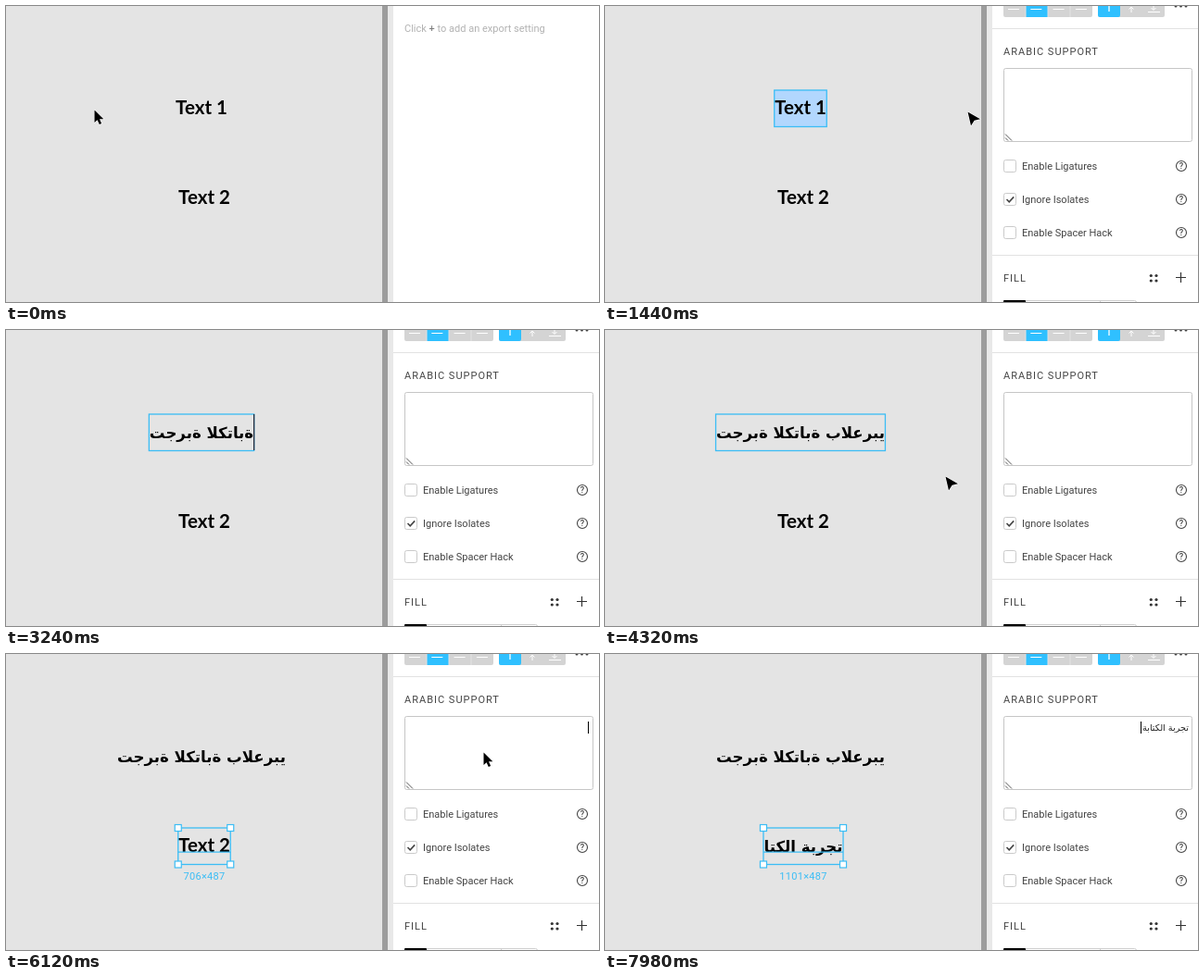
An HTML page for the animation above (8000 ms loop, 640 by 320 pixels).

```html
<!DOCTYPE html>
<html lang="en">
<head>
<meta charset="utf-8">
<title>Arabic text support</title>
<style>
  html, body { margin: 0; width: 100%; height: 100%; overflow: hidden; background: #e4e4e4; }
  svg { display: block; width: 640px; height: 320px; }
  text { font-family: Roboto, sans-serif; font-size: 11px; fill: #444; white-space: pre; }
  .head { letter-spacing: 1px; }
  .layer { fill: #000; font-weight: 700; text-anchor: middle; direction: rtl; }
  .label { fill: #3bbdf5; text-anchor: middle; letter-spacing: .3px; }
  .arabic { font-family: "DejaVu Sans", sans-serif; fill: #222; direction: rtl; text-anchor: start; }
</style>
</head>
<body>
<svg id="stage" viewBox="0 0 640 320">
  <rect width="640" height="320" fill="#e4e4e4"/>
  <rect x="406" width="6" height="320" fill="#9c9c9c"/>
  <rect x="412" width="6" height="320" fill="#e8e8e8"/>
  <rect x="418" width="222" height="320" fill="#fff"/>
  <text id="hint" x="430" y="28" style="fill:#b2b2b2">Click <tspan fill="#777">+</tspan> to add an export setting</text>
  <g id="panel"></g>
  <g id="canvas"></g>
  <g id="cursor"></g>
</svg>
<script>
const LOOP = 8000;
const BLUE = '#3bbdf5';
const PHRASE = 'تجربة الكتابة بالعربي';
const SHORT = PHRASE.slice(0, 13);
const $ = id => document.getElementById(id);

function add(parent, tag, attrs = {}, content = '') {
  const el = document.createElementNS('http://www.w3.org/2000/svg', tag);
  set(el, attrs);
  el.textContent = content;
  return parent.appendChild(el);
}
function set(el, attrs) {
  for (const k in attrs) el.setAttribute(k, attrs[k]);
}
function show(el, on) {
  el.setAttribute('visibility', on ? 'visible' : 'hidden');
}
const reverse = s => [...s].reverse().join('');

// Inspector panel
const panel = $('panel');
const box = (x, y, width, height, fill, more) => add(panel, 'rect', { x, y, width, height, fill, ...more });
const line = (d, stroke, width = 1) =>
  add(panel, 'path', { d, stroke, fill: 'none', 'stroke-width': width });

function buildPanel() {
  box(430, -10, 96, 22, '#d4d4d4', { rx: 2 });
  box(454, -10, 24, 22, '#2fc0ff');
  line('M454 0V12M478 0V12M502 0V12', '#e2e2e2');
  for (let i = 0; i < 4; i++) line(`M${435 + i * 24.3} 3.5h12`, '#fff');
  box(532, -10, 72, 22, '#d4d4d4', { rx: 2 });
  box(532, -10, 24, 22, '#2fc0ff', { rx: 2 });
  line('M544 0V6', '#fff', 1.3);
  line('M568 7V1M565.5 3.5L568 1L570.5 3.5', '#fff');
  line('M592 0V4M589.5 2L592 4.5L594.5 2M586 6.5H599', '#fff');
  for (const cx of [616, 621.5, 627]) add(panel, 'circle', { cx, cy: 0, r: 1.5, fill: '#444' });
  line('M418 24.5H640M418 269.5H640', '#e2e2e2');

  add(panel, 'text', { x: 430, y: 53, class: 'head' }, 'ARABIC SUPPORT');
  box(430.5, 67.5, 203, 79, '#fff', { rx: 2, stroke: '#c6c6c6' });
  line('M432 138.5L439 145.5M432 142.5L435 145.5', '#555');

  ['Enable Ligatures', 'Ignore Isolates', 'Enable Spacer Hack'].forEach((name, i) => {
    const y = 173 + i * 36;
    box(430.5, y - 6.5, 13, 13, '#fff', { rx: 2, stroke: '#cacaca' });
    if (i === 1) line(`M433.5 ${y}l2.7 2.8l5 -5.4`, '#444', 1.6);
    add(panel, 'text', { x: 450, y: y + 4 }, name);
    add(panel, 'circle', { cx: 622, cy: y, r: 5.5, fill: 'none', stroke: '#444', 'stroke-width': 1.1 });
    add(panel, 'text', { x: 622, y: y + 3.3, 'text-anchor': 'middle', style: 'font-size:9px;font-weight:500' }, '?');
  });

  add(panel, 'text', { x: 430, y: 298, class: 'head' }, 'FILL');
  for (const cx of [589.3, 595])
    for (const cy of [291.5, 297]) add(panel, 'circle', { cx, cy, r: 1.6, fill: '#333' });
  line('M616 293.5H627M621.5 288V299', '#333', 1.2);
  box(430.5, 318.5, 143, 20, '#fff', { rx: 2, stroke: '#cfcfcf' });
  line('M534.5 318V320', '#cfcfcf');
  box(430, 318, 24, 4, '#000', { rx: 1 });
}
buildPanel();
const field = add(panel, 'text', { x: 630, y: 83, class: 'arabic' });
const caret = add(panel, 'rect', { y: 73, width: 1, height: 13, fill: '#000' });

// Picks the type size at which a phrase has its natural width on the stage
function sizeFor(el, content, width) {
  el.textContent = content;
  el.style.fontSize = '100px';
  return 100 * width / el.getComputedTextLength();
}

// Text layers on the canvas
class Layer {
  constructor(name, cx, base) {
    Object.assign(this, { name, cx, base });
    const g = $('canvas');
    this.mark = add(g, 'rect', { fill: '#b2d7fe' });
    this.text = add(g, 'text', { x: cx, y: base, class: 'layer' });
    this.under = add(g, 'path', { stroke: BLUE, 'stroke-width': 1.2 });
    this.frame = add(g, 'rect', { fill: 'none', stroke: BLUE, 'stroke-width': 1.3 });
    this.caret = add(g, 'rect', { width: 1.2, height: 39, fill: '#223' });
    this.handles = [0, 1, 2, 3].map(() =>
      add(g, 'rect', { width: 7, height: 7, fill: '#fff', stroke: BLUE, 'stroke-width': 1.2 }));
    this.label = add(g, 'text', { x: cx, y: base + 30, class: 'label' });
  }
  write(content) {
    const latin = content === this.name;
    this.text.style.fontFamily = latin ? 'Lato, sans-serif' : '"DejaVu Sans", sans-serif';
    this.text.style.fontSize = (latin ? 20.5 : layerSize) + 'px';
    this.text.textContent = content;
    return latin ? 55.5 : this.text.getComputedTextLength();
  }
  // mode: '', 'hover', 'select' or 'edit'
  draw(content, mode, { marked = false, blink = false } = {}) {
    const w = this.write(content) + 1;
    const x = this.cx - w / 2, y = this.base - 26, h = 39.5;
    const selected = mode === 'select';
    set(this.frame, { x, y, width: w, height: h });
    set(this.mark, { x, y, width: w, height: h });
    set(this.under, { d: `M${x} ${this.base + .2}h${w}` });
    set(this.caret, { x: x + w - .6, y });
    this.handles.forEach((el, i) => {
      set(el, { x: x + (i % 2) * w - 3.5, y: y + (i > 1) * h - 3.5 });
      show(el, selected);
    });
    const units = content === this.name ? 706 : Math.round((w - 1) * unitsPerPx);
    this.label.textContent = units + '×487';
    show(this.label, selected);
    show(this.under, selected || mode === 'hover');
    show(this.frame, selected || mode === 'edit');
    show(this.mark, marked);
    show(this.caret, blink);
  }
}
const first = new Layer('Text 1', 211, 117);
const second = new Layer('Text 2', 214, 214);

first.text.style.fontFamily = '"DejaVu Sans", sans-serif';
const layerSize = sizeFor(first.text, reverse(PHRASE), 182);
field.style.fontSize = sizeFor(field, SHORT, 50) + 'px';
const unitsPerPx = 1101 / second.write(PHRASE.slice(0, 11));

// Pointer shapes
const pointer = d => add($('cursor'), 'path', {
  d, fill: '#000', stroke: '#fff', 'stroke-width': 1.2, 'stroke-linejoin': 'round', 'paint-order': 'stroke'
});
const arrow = pointer('M.5 .5V14L3.6 11.2L5.8 16L8.1 15L6 10.3H10.3Z');
const wide = pointer('M.5 .5L14 8.3L7.6 9.8L4 15.6Z');

// Time, x, y
const PATH = [
  [0, 95, 112], [60, 108, 112], [120, 150, 111], [180, 198, 110], [240, 218, 109],
  [960, 218, 109], [1260, 320, 114], [1440, 391, 114],
  [4200, 391, 114], [4320, 367, 158], [4560, 345, 182], [4860, 345, 182],
  [5160, 224, 205], [5340, 224, 205], [5640, 500, 122], [5940, 515, 106], [8000, 515, 106]
];
function pointerAt(t) {
  const i = PATH.findIndex(p => p[0] > t);
  const [t0, x0, y0] = PATH[i - 1], [t1, x1, y1] = PATH[i];
  const k = (t - t0) / (t1 - t0);
  return [x0 + (x1 - x0) * k, y0 + (y1 - y0) * k];
}

const typed = (t, start, step, max) =>
  t < start ? 0 : Math.min(max, 1 + Math.floor((t - start) / step));

function render(time) {
  const t = Math.floor(time / 60) * 60;
  const open = t >= 480;
  show($('hint'), !open);
  $('panel').style.display = open ? '' : 'none';

  const editing = t >= 780 && t < 4560;
  const n = typed(t, 1620, 135, 5) + typed(t, 2460, 100, 8) + typed(t, 3300, 100, 8);
  const mode1 = t < 240 ? '' : t < 480 ? 'hover' : editing ? 'edit' : t < 5280 ? 'select' : '';
  first.draw(n ? reverse(PHRASE.slice(0, n)) : first.name, mode1, {
    marked: editing && !n,
    blink: n > 0 && t < 4260
  });

  const letters = typed(t, 6420, 120, 13);
  const applied = typed(t, 6720, 120, 13);
  const mode2 = t >= 5280 ? 'select' : t >= 5160 ? 'hover' : '';
  second.draw(applied ? PHRASE.slice(0, applied) : second.name, mode2);

  field.textContent = SHORT.slice(0, letters);
  set(caret, { x: letters ? Math.round(628 - field.getComputedTextLength()) : 628 });
  caret.style.display = t >= 6120 ? '' : 'none';

  const hidden = (t >= 1620 && t < 4200) || t >= 6420;
  const free = editing && t >= 1080;
  const [x, y] = pointerAt(t);
  set($('cursor'), { transform: `translate(${x} ${y})` });
  show(arrow, !hidden && !free);
  show(wide, !hidden && free);
}

function tick() {
  render(performance.now() % LOOP);
  requestAnimationFrame(tick);
}
tick();
</script>
</body>
</html>
```
